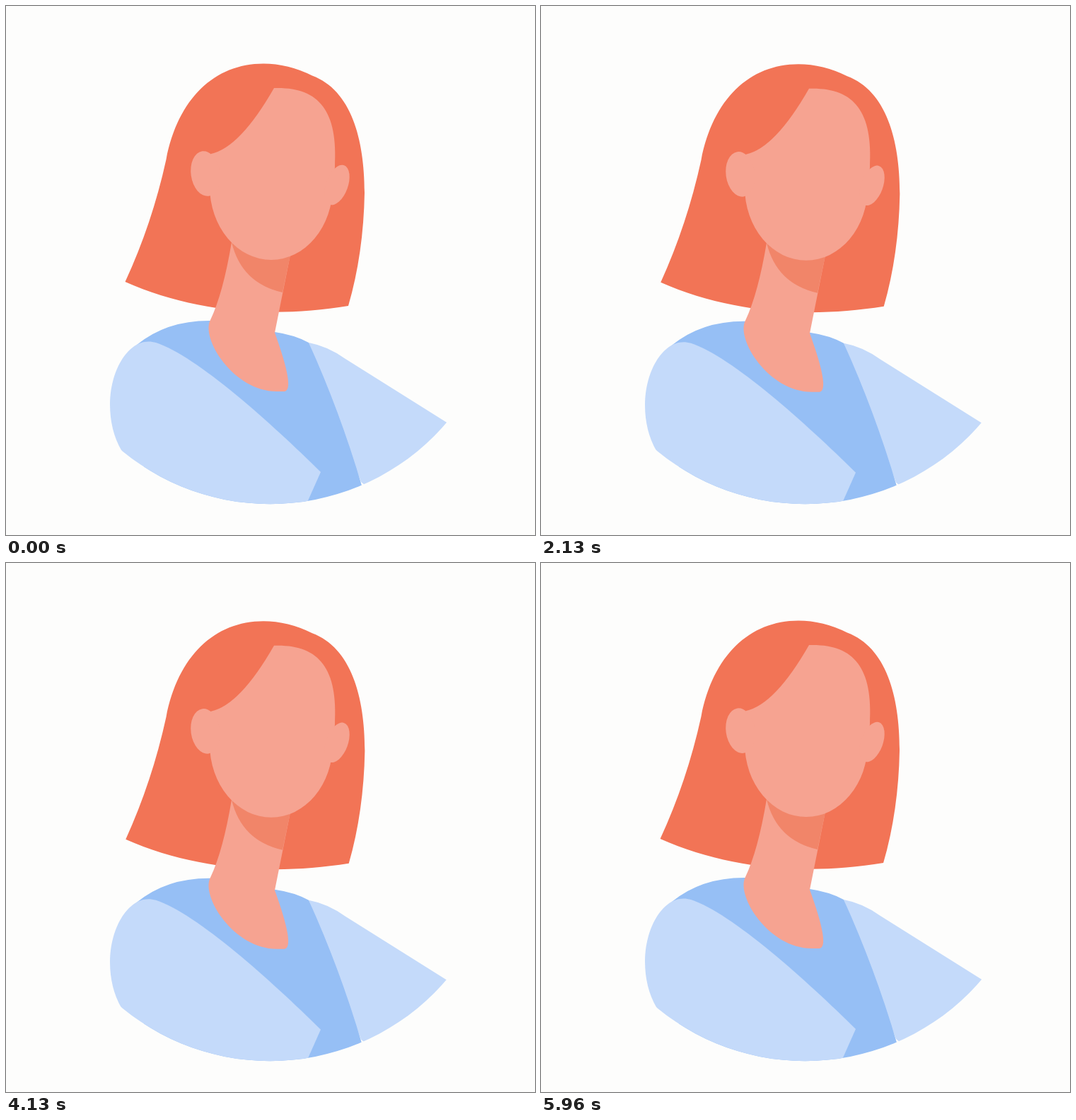
Write an HTML page with a canvas that moves like this. It is 748x748 px and loops after 6 s.

```html
<!DOCTYPE html>
<html lang="en">
<head>
<meta charset="utf-8">
<title>Portrait</title>
<style>
html, body { margin: 0; width: 100%; height: 100%; overflow: hidden; background: #fdfdfc; }
canvas { display: block; width: 100vw; height: 100vh; }
</style>
</head>
<body>
<canvas id="stage" width="748" height="748"></canvas>
<script>
const SIZE = 748, LOOP = 6000, FPS = 24, CYCLE = 48;
const DROP = 20.6, SWING = 19.5;
const color = {
  back: '#fdfdfc', hair: '#f27456', skin: '#f6a391', shade: '#f18569',
  chest: '#96bff5', sleeve: '#c4dafa'
};
const ctx = document.getElementById('stage').getContext('2d');

const chest = new Path2D('M185 479Q228 444 290 445L380 461Q408 465 428 476Q472 573 503 678V740H200Z');
const farSleeve = new Path2D('M428 476Q455 481 480 499L660 612V677H507L502 673Z');
const nearSleeve = new Path2D('M445 659C375 590 270 495 212 476C176 465 147 513 147 563Q147 600 163 628L240 760H400Z');
const neck = new Path2D('M319 334Q307 406 289 444C275 470 322 545 383 545H394Q409 542 380 462L402 352Z');
const shade = new Path2D('M319 334Q333 392 391 405L402 352Z');
const face = new Path2D('M290 209Q331 200 379 116C441 114 470 146 465 228L462 255A87 104 0 0 1 288 255Z');

// Smooth 0 -> 1 -> 0 over one cycle, reaching 1 at the given step
function sway(step, peak) {
  const u = step < peak ? step / peak : (CYCLE - step) / (CYCLE - peak);
  return (1 - Math.cos(Math.PI * u)) / 2;
}

function fill(path, tint) {
  ctx.fillStyle = tint;
  ctx.fill(path);
}

function ear(x, y, rx, ry, tilt) {
  const path = new Path2D();
  path.ellipse(x, y, rx, ry, tilt * Math.PI / 180, 0, Math.PI * 2);
  fill(path, color.skin);
}

// The crown is fixed; the tips swing sideways by s and pull the sides and hem along
function hair(s) {
  const left = 168.5 + s, right = 484 + s;
  const side = 507 + s / 2, sideY = 264 + s * 0.6;
  const path = new Path2D();
  path.moveTo(left, 390);
  path.quadraticCurveTo(206.5 + s * 0.2, 308 - s * 0.3, 226.5, 217);
  path.bezierCurveTo(243, 131, 295, 81.5, 364, 81.5);
  path.quadraticCurveTo(399, 81.5, 433, 98.5);
  path.bezierCurveTo(488, 119, side, sideY - 76, side, sideY);
  path.quadraticCurveTo(side - 1.5, 350 + s * 0.4, right, 424);
  path.bezierCurveTo(375 + s * 1.2, 442 - s * 1.1, 265 + s * 1.5, 433 - s * 0.3, left, 390);
  return path;
}

function draw(ms) {
  const step = Math.floor((ms % LOOP + 5) * FPS / 1000) % CYCLE;
  const drop = DROP * sway(step, 23);

  ctx.fillStyle = color.back;
  ctx.fillRect(0, 0, SIZE, SIZE);

  ctx.save();
  ctx.translate(0, drop);
  fill(hair(SWING * sway(step, 24)), color.hair);
  ctx.restore();

  // The bust is cut off by a fixed circle
  ctx.save();
  ctx.beginPath();
  ctx.arc(373.3, 375.7, 328.5, 0, Math.PI * 2);
  ctx.clip();
  ctx.translate(0, drop);
  fill(farSleeve, color.sleeve);
  fill(chest, color.chest);
  fill(nearSleeve, color.sleeve);
  ctx.restore();

  ctx.save();
  ctx.translate(0, drop);
  fill(neck, color.skin);
  fill(shade, color.shade);
  fill(face, color.skin);
  ear(282, 237, 20.5, 32, -8);
  ear(468, 253, 15.5, 29.5, 20);
  ctx.restore();
}

const start = performance.now();
function tick() {
  draw(performance.now() - start);
  requestAnimationFrame(tick);
}
tick();
</script>
</body>
</html>
```
